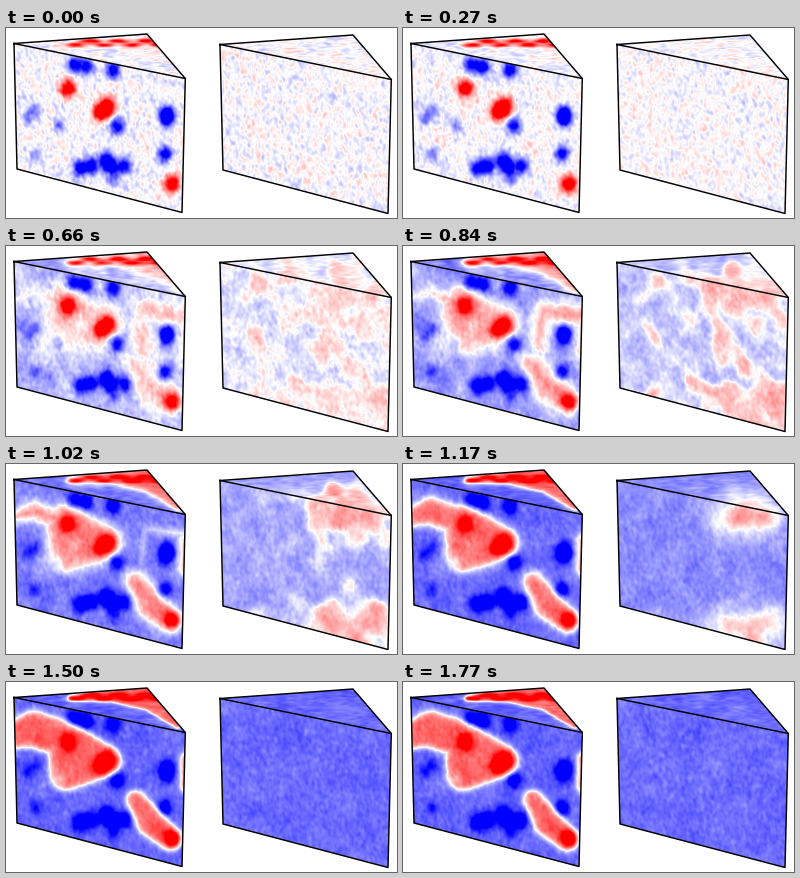
Animation, 391 px wide and 190 px high, one loop 1800 ms. Source, as a matplotlib script:

```python
import numpy as np
import matplotlib.pyplot as plt
from matplotlib.animation import FuncAnimation
from matplotlib.patches import PathPatch
from matplotlib.path import Path

W, H, DPI = 391, 190, 100
FRAMES, STEP = 60, 30
rng = np.random.default_rng(7)

X, Y = np.meshgrid(np.arange(W) + 0.5, np.arange(H) + 0.5)
FX, FY = np.meshgrid(np.fft.rfftfreq(W), np.fft.fftfreq(H))

# Corners: left, apex, right, bottom right, bottom left
PRISM = np.array([(8, 15.5), (141, 6), (179.3, 50.5), (176, 184.5), (11, 141)])
PRISMS = [PRISM, PRISM + (206, 1)]
RIGHT = X > 196


def inside(poly):
    points = np.column_stack([X.ravel(), Y.ravel()])
    return Path(poly).contains_points(points).reshape(H, W)


TOP = inside(PRISMS[0][:3]) | inside(PRISMS[1][:3])


def ease(t, a, b):
    u = np.clip((t - a) / (b - a), 0, 1)
    return u * u * (3 - 2 * u)


def noise(sx, sy, shear, keep):
    """Smooth random field for every frame, correlated in time."""
    k = (sx * (FX + shear * FY)) ** 2 + (sy * FY) ** 2
    kernel = np.exp(-2 * np.pi ** 2 * k)
    out, state = [], 0
    for n in range(FRAMES):
        fresh = np.fft.irfft2(np.fft.rfft2(rng.standard_normal((H, W))) * kernel, (H, W))
        fresh /= fresh.std()
        state = keep * state + np.sqrt(1 - keep ** 2) * fresh if n else fresh
        out.append(state.astype(np.float32))
    return out


def spots(centres, rx, ry):
    return sum(np.exp(-0.5 * (((X - x) / rx) ** 2 + ((Y - y) / ry) ** 2))
               for x, y in centres)


def chain(*discs):
    """Signed distance to a string of discs (x, y, r) joined by tapered strokes."""
    best = np.full((H, W), -np.inf)
    for (x0, y0, r0), (x1, y1, r1) in zip(discs, discs[1:]):
        dx, dy = x1 - x0, y1 - y0
        u = np.clip(((X - x0) * dx + (Y - y0) * dy) / (dx * dx + dy * dy), 0, 1)
        dist = np.hypot(X - x0 - u * dx, Y - y0 - u * dy)
        best = np.maximum(best, r0 + u * (r1 - r0) - dist)
    return best


fine = [np.where(TOP, a, b) for a, b in zip(noise(2.6, 0.7, 0, 0.8),
                                            noise(1.1, 1.6, 0.22, 0.8))]
coarse = noise(5.5, 6, 0.22, 0.96)

# Pinning sites, fixed in the left prism
RED = [(62, 60), (95, 84), (102, 78), (166, 156)]
BLUE = [(80, 39), (68, 37), (107, 42), (161, 86), (161, 91), (159, 126), (111, 98),
        (74, 140), (85, 138), (100, 132), (105, 139), (118, 138)]
FAINT = [(30, 83), (22, 90), (53, 98), (29, 126), (108, 151)]
RIDGE = [(70 + 14 * k, 15 + 2 * np.cos(np.pi * k)) for k in range(7)]
PINS = np.where(TOP, 1.1 * spots(RIDGE, 7, 1.6),
                1.4 * spots(RED, 5.5, 6) - 1.15 * spots(BLUE, 5, 5.7)
                - 0.5 * spots(FAINT, 4, 5))

# Red domains of the left prism
CORE = np.maximum.reduce([
    chain((60, 92, 16), (61, 60, 19), (100, 79, 15), (60, 92, 16)),
    chain((130, 118, 9), (145, 140, 14), (164, 157, 11)),
    chain((182, 78, 7), (182, 104, 7))])
LOBE = chain((6, 54, 13), (28, 47, 18), (60, 58, 18))
BRIDGE = chain((135, 100, 10), (140, 65, 12), (178, 70, 14))
RIBBON = chain((65, 16, 2.5), (105, 13, 7), (145, 13, 16), (172, 40, 6))


def pinned(t):
    """Domains sharpen and stay, the lobe joins, the bridge dies out."""
    width = 14 - 10 * ease(t, .4, 1.4)
    front = np.maximum.reduce([CORE, LOBE - 14 * (1 - ease(t, .8, 1.4)),
                               BRIDGE - 28 * ease(t, .7, 1.3)])
    order = np.where(TOP, np.tanh(2 * RIBBON / width), np.tanh(front / width))
    return 0.6 * ease(t, .1, 1.3) * order + PINS * (1 - .3 * ease(t, .2, 1.2))


def free(t, ripple):
    """Two droplets whose area shrinks at a constant rate until they vanish."""
    area = 2860 * (1.24 - t)
    radius = np.sign(area) * np.sqrt(abs(area))
    dist = np.minimum(np.hypot((X - 346) / 2, Y - 53),
                      np.hypot((X - 348) / 2, Y - 163))
    wobble = 11 * ripple * (1 - ease(t, .8, 1.3))
    return 0.58 * ease(t, .4, 1.5) * np.tanh((radius - dist + wobble) / 13)


def field(i):
    t = i * STEP / 1000
    v = np.where(RIGHT, free(t, coarse[i]), pinned(t))
    v += coarse[i] * (.025 + .04 * np.exp(-((t - .75) / .25) ** 2))
    v += fine[i] * (.075 - .037 * ease(t, 0, 1.2))
    v -= .02 * (1 - ease(t, 0, .5))
    return np.clip(v, -1, 1)


fig = plt.figure(figsize=(W / DPI, H / DPI), dpi=DPI, facecolor="white")
ax = fig.add_axes([0, 0, 1, 1])
ax.set(xlim=(0, W), ylim=(H, 0))
ax.axis("off")

outlines = [np.vstack([p, p[:1]]) for p in PRISMS]
hull = Path.make_compound_path(*map(Path, outlines))
img = ax.imshow(field(0), cmap="bwr", vmin=-1, vmax=1, extent=(0, W, H, 0),
                interpolation="nearest", aspect="auto")
img.set_clip_path(PathPatch(hull, transform=ax.transData))
for p, outline in zip(PRISMS, outlines):
    for line in (outline, p[[0, 2]]):
        ax.plot(*line.T, color="black", lw=1.05, solid_joinstyle="round")


def update(i):
    img.set_data(field(i))
    return [img]


anim = FuncAnimation(fig, update, frames=FRAMES, interval=STEP,
                     repeat=True, repeat_delay=0)
plt.show()
```
